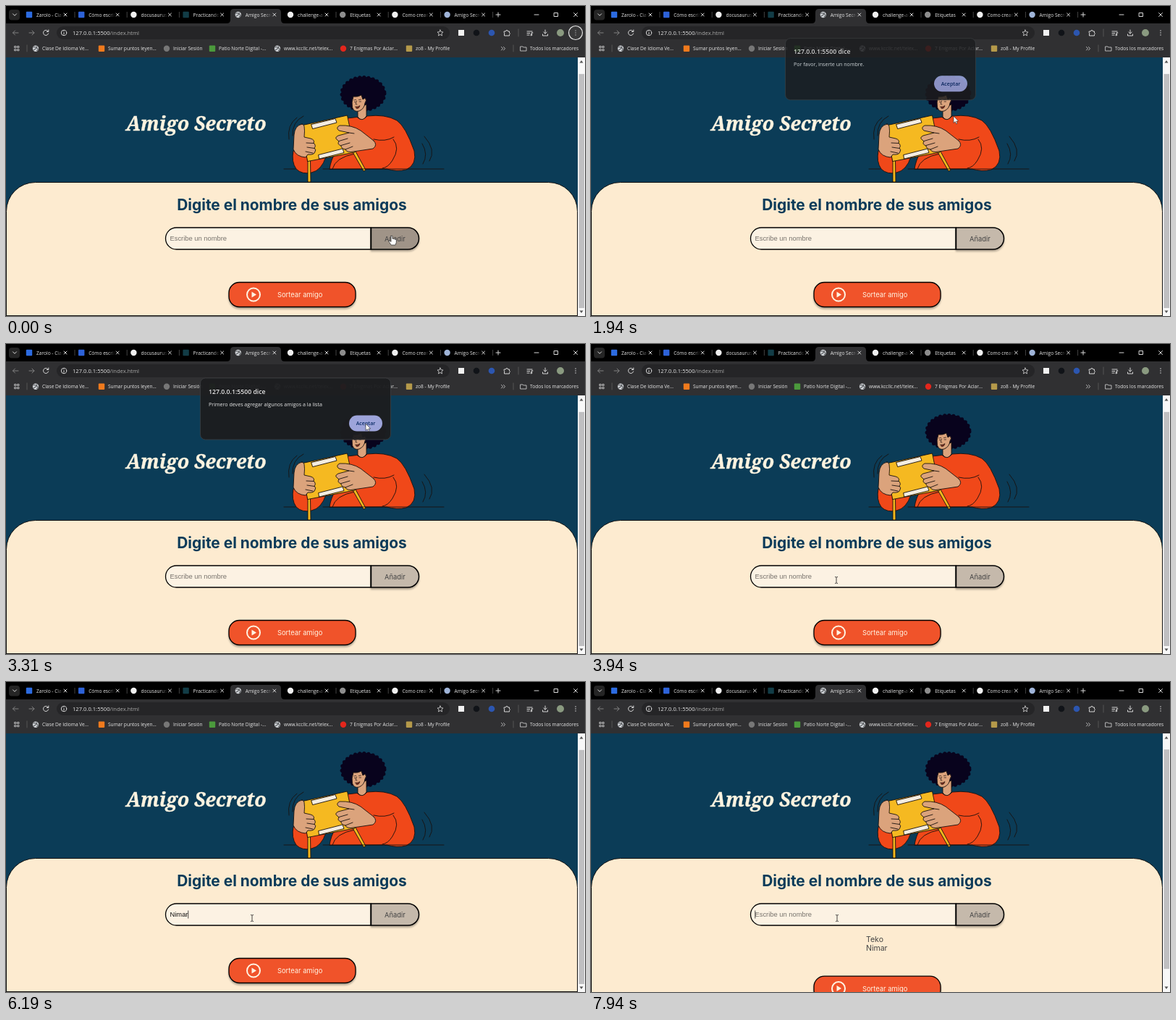
These frames come from a looping animation (800x428 px, 8000 ms). An HTML page:

```html
<!DOCTYPE html>
<html lang="es">
<head>
<meta charset="utf-8">
<title>Amigo Secreto</title>
<style>
  html, body { margin: 0; width: 100%; height: 100%; overflow: hidden; background: #000; }
  svg { display: block; width: 100vw; height: 100vh; }
  text { white-space: pre; }
  .ui { font: 6.6px "Open Sans", "Noto Sans", sans-serif; fill: #e6e6e6; }
  .page { font: 9.37px Inter, sans-serif; }
  .field { font: 9.37px "Liberation Sans", Arial, sans-serif; }
  .icon { fill: none; stroke: #d8d8d8; stroke-width: 1; stroke-linecap: round; stroke-linejoin: round; }
  .ink { stroke: #19110f; stroke-width: .9; stroke-linejoin: round; stroke-linecap: round; }
</style>
</head>
<body>
<svg viewBox="0 0 800 428">
  <defs>
    <linearGradient id="fade" gradientUnits="userSpaceOnUse" x1="27" x2="36.5" y1="0" y2="0">
      <stop stop-color="#e6e6e6"/><stop offset="1" stop-color="#e6e6e6" stop-opacity="0"/>
    </linearGradient>
    <filter id="shadow" x="-20%" y="-30%" width="140%" height="180%">
      <feDropShadow dx="0" dy="2.3" stdDeviation="1.3" flood-opacity=".3"/>
    </filter>
    <g id="globe">
      <circle r="4.2" fill="#cfd2d6"/>
      <path d="M-3.4-1.4Q-1-3 .2-1.6T-1 1-2.6 2.6M1.4-3.4Q.8-1 2.6 0T1.2 3.2" fill="none" stroke="#55585c" stroke-width="1.1"/>
    </g>
  </defs>

  <!-- page -->
  <rect y="71" width="790" height="357" fill="#0b3c57"/>
  <text x="166" y="172" fill="#fdf3e0" stroke="#fdf3e0" stroke-width=".4" style="font:italic 700 26.6px 'Noto Serif',serif">Amigo Secreto</text>

  <g class="ink">
    <ellipse cx="493.500" cy="121" rx="29.500" ry="22.500" fill="#08031d" stroke="#08031d" stroke-width="5" stroke-dasharray="0 6.2"/>
    <ellipse cx="493.500" cy="121" rx="30.500" ry="23.500" fill="#08031d" stroke="none"/>
    <path d="M447 225Q449 212 455 203L440 165Q462 155 485 153.500Q492 160 499 152Q524 149 540 158Q552 166 564 200Q568 219 553 226Q540 229 526 225Z" fill="#f04819"/>
    <path d="M486 143V153Q492 161 498 152V136Z" fill="#dba37c"/>
    <path d="M480 125Q477 133 478.500 140Q481 147 488 145Q495 142 496 134Q499 130 496 127L493 129 491 123Q486 126 480 125Z" fill="#dba37c"/>
    <path d="M483 139Q486 140 489 137.500Q488 142 484.500 141.500Z" fill="#7a2a1c" stroke-width=".6"/>
    <path d="M481 130l2.500-.5M487.500 129.500l3-.5M484.500 131l-1.500 4.500 2 .3M481.500 132.500h1.500M488 132h2.500" fill="none" stroke-width=".7"/>
    <path d="M451 225Q455 209 482 204M508 184Q524 188 536 181M535 184Q545 196 534 213Q528 223 520 224" fill="none"/>
    <path d="M397 200Q394 215 401 225Q409 233 422 230Q436 227 442 208L412 203Z" fill="#f04819"/>
    <path d="M417 211V243H421L420.500 211ZM478 200L494 228 497 226.500 482 199Z" fill="#f3b81d"/>
    <path d="M408 165L471.500 151 482 202 417 214.500Z" fill="#f5b921"/>
    <path d="M422 163.500L455 155.500 457 161 424 169.500ZM432 205.500L465 197 467 202.500 433 211Z" fill="#f5ede0"/>
    <path d="M409 163Q399 165 398 178L397 198Q401 208 414 209L417 205Q426 206 427 201Q429 199 426 196Q429 193 425 189Q427 185 421 183L412 181Q413 172 412 166Q411 163 409 163Z" fill="#dba37c"/>
    <path d="M415 189L425 189.500M416 195L426 196.500M414 201L424 203" fill="none"/>
    <path d="M508 186L490 172Q478 164 461 165Q455 168 460 172L474 175 459 179Q453 182 458 185L460 187Q457 191 463 193Q463 197 469 198Q471 203 480 201L507 197Q514 192 508 186Z" fill="#dba37c"/>
    <path d="M460 186.500L472 183M463 192.500L475 189M469 198L479 194M474 175L481 176" fill="none"/>
    <path d="M384 225H400M438 225H605M391 184Q388 164 402 154M396 179Q395 160 411 152M575 190Q584 205 576 218M578 180Q595 199 585 214" fill="none"/>
  </g>

  <path d="M.5 480V283.500A40 40 0 0 1 40.500 243.500H749.500A40 40 0 0 1 789.500 283.500V480" fill="#fdebd0" stroke="#111"/>
  <text x="395" y="282" text-anchor="middle" fill="#0b3b59" style="font:700 20.9px Inter,sans-serif">Digite el nombre de sus amigos</text>

  <path d="M504 306H235.500A15 15 0 0 0 235.500 336H504Z" fill="#fcf2e3" stroke="#000" stroke-width="1.300"/>
  <text id="entry" class="field" x="226.500" y="324"></text>
  <path id="caret" d="M0 315.500v11" stroke="#222" stroke-width=".8"/>
  <path id="add" d="M504.500 306H555.500A15 15 0 0 1 555.500 336H504.500Z" stroke="#000" stroke-width="1.500" filter="url(#shadow)"/>
  <text class="page" x="537.500" y="324.500" text-anchor="middle" fill="#444">Añadir</text>
  <g id="list" style="font:10.54px Inter,sans-serif" fill="#444">
    <text x="380" y="358.600"></text><text x="380" y="370.900"></text>
  </g>
  <g id="lower">
    <rect id="draw" x="308" y="381.500" width="175" height="34" rx="14.500" stroke="#000" stroke-width="1.300" filter="url(#shadow)"/>
    <circle cx="342" cy="398.500" r="9" fill="none" stroke="#fff3e2" stroke-width="2"/>
    <path d="M339.500 394.500L346 398.500 339.500 402.500Z" fill="#fff3e2"/>
    <text class="page" x="375" y="402" fill="#fff3e2">Sortear amigo</text>
    <path d="M0 427.500H790" stroke="#111"/>
  </g>

  <rect x="790" y="71" width="10" height="357" fill="#f8f8f8"/>
  <path d="M792.500 78.500L795 75 797.500 78.500ZM792.500 420.500L795 424 797.500 420.500Z" fill="#555"/>
  <rect id="thumb" x="791.500" width="7.500" fill="#bfbfc1"/>

  <!-- browser -->
  <rect width="800" height="24" fill="#000"/>
  <rect y="24" width="800" height="47" fill="#303032"/>
  <path d="M305 24Q310 24 310 19V9Q310 4 315 4H375Q380 4 380 9V19Q380 24 385 24Z" fill="#303032"/>
  <rect x="4" y="5" width="15" height="14.500" rx="4" fill="#252525"/>
  <rect x="70" y="28" width="543" height="18" rx="9" fill="#252527"/>
  <g id="tabs" class="ui"></g>
  <g class="icon">
    <path d="M9.500 10.800L12 13.300 14.500 10.800M677 12H683M680 9V15M730 12H736M757.500 9.500H762.500V14.500H757.500ZM784.500 9.500L789.500 14.500M789.500 9.500L784.500 14.500"/>
    <path d="M17 37H9.500M12.500 34L9.500 37 12.500 40M32 37H39M36 34L39 37 36 40" stroke="#808080"/>
    <path d="M58.200 35A3.600 3.600 0 1 0 58.600 38M58.800 33V35.500H56.300"/>
    <circle cx="80" cy="37" r="3.700"/><path d="M80 36.800V39M80 35V35.100"/>
    <path d="M600 33L601.200 35.700 604 36 601.900 38 602.500 41 600 39.400 597.500 41 598.100 38 596 36 598.800 35.700Z" stroke-width=".8"/>
    <path d="M688.500 35H690.500A1.500 1.500 0 0 1 693.500 35H695.500V37A1.500 1.500 0 0 1 695.500 39.500V41H688.500V39A1.500 1.500 0 0 0 688.500 37Z"/>
    <path d="M708 32V42M29 54V63M701 54V63" stroke="#666" stroke-width=".7"/>
    <path d="M720 35H727M720 37.500H724M720 40H723M726.500 40V36.500L728 37"/><circle cx="725.700" cy="40" r=".9"/>
    <path d="M745 33V38M742.800 36L745 38.200 747.200 36M741.500 39V41H748.500V39"/>
    <path d="M787 34V34.100M787 37V37.100M787 40V40.100" stroke-width="1.500"/>
    <path d="M711 56H714L715 57H719V62H711ZM684.500 56.500L686.500 58.700 684.500 61M687.500 56.500L689.500 58.700 687.500 61" stroke-width=".8"/>
    <path d="M12 55.500h2v2h-2zM16 55.500h2v2h-2zM12 59.700h2v2h-2zM16 59.700h2v2h-2z" stroke-width=".8"/>
  </g>
  <rect x="625" y="33" width="8" height="8" fill="#f2f2f2"/>
  <circle cx="650" cy="37" r="4.300" fill="#101318"/>
  <circle cx="671" cy="37" r="4.300" fill="#2c56b0"/>
  <circle cx="766" cy="37" r="5" fill="#8a9a80"/>
  <circle id="menuRing" cx="787" cy="37" r="9.500" fill="#4a4a4a" fill-opacity=".35" stroke="#e4e4e4" stroke-width="1.200"/>
  <text class="ui" x="92" y="39.800" style="font-size:7.6px">127.0.0.1:5500<tspan fill="#a9a9a9">/index.html</tspan></text>
  <g id="bookmarks" class="ui"></g>

  <!-- alert -->
  <g id="dialog" class="ui">
    <rect x="268.500" y="47" width="263" height="85" rx="7" fill="#1d1e20" fill-opacity=".96" stroke="#3d3f42" stroke-width=".8"/>
    <text x="280" y="68.500" style="font-size:8.7px;font-weight:600">127.0.0.1:5500 dice</text>
    <text id="message" x="280" y="85.500" style="font-size:7.1px"></text>
    <rect id="focus" x="472.300" y="97" width="49.500" height="25" rx="12.500" fill="#1d1e20" stroke="#b9d0fb" stroke-width="1.300"/>
    <rect id="accept" x="474" y="98.500" width="46" height="22" rx="11"/>
    <text x="497" y="112.200" text-anchor="middle" style="font-size:7.1px;font-weight:600;fill:#0b2c66">Aceptar</text>
  </g>

  <g id="pointer" stroke-linejoin="round">
    <path id="arrow" d="M0 0V9.500L2.200 7.500 3.700 10.800 5.200 10.100 3.800 7H6.700Z" fill="#fff" stroke="#222" stroke-width=".6"/>
    <path id="hand" d="M-1 .7Q0-.6 1 .7V4.300Q2.200 3.600 2.900 4.700Q4 4.200 4.600 5.200Q6.200 4.800 6.300 6.400V9.300L5 13H-.8L-3.800 8.500Q-4.400 7-3 6.900L-1 8.500Z" fill="#fff" stroke="#222" stroke-width=".7"/>
    <path id="beam" d="M-2-4.500Q0-4.500 0-3.500Q0-4.500 2-4.500M0-3.500V3.500M-2 4.500Q0 4.500 0 3.500Q0 4.500 2 4.500" fill="none" stroke="#333" stroke-width=".9"/>
  </g>
</svg>
<script>
const $ = id => document.getElementById(id);
const show = (id, on) => $(id).style.display = on ? '' : 'none';
const set = (id, attrs) => Object.entries(attrs).forEach(([k, v]) => $(id).setAttribute(k, v));
const clamp = v => Math.max(0, Math.min(1, v));
const LOOP = 8000, LINE = 12.3;

const mark = (x, y, color, round) => color === 'globe'
  ? `<use href="#globe" x="${x}" y="${y}"/>`
  : `<rect x="${x - 4.2}" y="${y - 4.2}" width="8.4" height="8.4" rx="${round ? 4.2 : 1}" fill="${color}"/>`;

$('tabs').innerHTML = [
  ['Zarolo - Clases', '#2c6be0'], ['Cómo escribir', '#2d62d8'], ['docusaurus', '#f0f0f0', true],
  ['Practicando', '#123c46'], ['Amigo Secreto', 'globe'], ['challenge-amigo', '#f0f0f0', true],
  ['Etiquetas', '#8d8d8d', true], ['Como crear', '#f0f0f0', true], ['Amigo Secreto', '#9fb4d8', true]
].map(([label, color, round], i) => `<g transform="translate(${42 + 72.2 * i} 0)">
  ${mark(-10, 12, color, round)}<text y="14.5" style="fill:url(#fade)">${label}</text>
  <path class="icon" d="M38 10l4 4M42 10l-4 4"/>
  ${i === 3 || i === 4 ? '' : '<path d="M53 8v8" stroke="#555" stroke-width=".8"/>'}</g>`).join('');

$('bookmarks').innerHTML = [
  [50, 'Clase De Idioma Ve...', 'globe'], [141, 'Sumar puntos leyen...', '#f07a1d'],
  [231, 'Iniciar Sesión', '#777', true], [294, 'Patio Norte Digital -...', '#4b9a3c'],
  [384, 'www.kccllc.net/telex...', 'globe'], [475, '7 Enigmas Por Aclar...', '#e3261c', true],
  [566, 'zo8 - My Profile', '#b59a4a']
].map(([x, label, ...icon]) => mark(x - 9, 58.7, ...icon) + `<text x="${x}" y="61.2">${label}</text>`).join('')
  + '<text x="724" y="61.2">Todos los marcadores</text>';

const path = [
  [0, 533, 317], [1000, 533, 317], [1500, 497, 112], [1780, 497, 112], [1940, 501, 152],
  [2400, 423, 396], [2900, 423, 396], [3250, 497, 110], [3420, 497, 110], [3900, 339, 326],
  [4600, 339, 326], [5000, 340, 326], [LOOP, 340, 326]
];
const alerts = [
  { open: 250, press: 1720, close: 1900, text: 'Por favor, inserte un nombre.' },
  { open: 2480, press: 3300, close: 3400, text: 'Primero deves agregar algunos amigos a la lista' }
];
const entries = [
  { name: 'Nimar', start: 5150, step: 190, enter: 6560 },
  { name: 'Teko', start: 6900, step: 170, enter: 7750 }
];
const CLICK_FIELD = 4250;

function pointerAt(t) {
  const i = path.findIndex(p => p[0] > t);
  const [t0, x0, y0] = path[i - 1], [t1, x1, y1] = path[i];
  const u = (t - t0) / (t1 - t0), k = u * u * (3 - 2 * u);
  return [x0 + (x1 - x0) * k, y0 + (y1 - y0) * k];
}

function drawAlert(t) {
  const a = alerts.find(a => t >= a.open && t < a.close + 120);
  show('dialog', a);
  if (!a) return;
  const p = (1 - (1 - clamp((t - a.open) / 190)) ** 2) * (1 - clamp((t - a.close) / 120) ** 2);
  set('dialog', { opacity: p, transform: `translate(0 ${-20 * (1 - p)})` });
  $('message').textContent = a.text;
  show('focus', t < a.press);
  set('accept', { fill: t < a.press ? '#a9c3f7' : '#9da4da' });
}

function drawEntry(t) {
  const added = entries.filter(e => t >= e.enter);
  const current = entries.find(e => t >= e.start && t < e.enter);
  const typed = current ? current.name.slice(0, 1 + Math.floor((t - current.start) / current.step)) : '';
  const entry = $('entry');
  entry.textContent = typed || 'Escribe un nombre';
  entry.setAttribute('fill', typed ? '#111' : '#77726c');

  // The caret restarts its blink after every edit.
  const edits = [CLICK_FIELD, ...entries.flatMap(e =>
    [...[...e.name].map((_, i) => e.start + i * e.step), e.enter])];
  const last = Math.max(...edits.filter(e => e <= t));
  show('caret', t >= CLICK_FIELD && (t - last) % 1000 < 500);
  set('caret', { transform: `translate(${226.8 + (typed ? entry.getComputedTextLength() : 0)} 0)` });

  const names = added.map(e => e.name).reverse();
  [...$('list').children].forEach((line, i) => line.textContent = names[i] || '');
  const shift = names.length * LINE, scale = 334 / (369 + shift);
  set('lower', { transform: `translate(0 ${shift})` });
  set('thumb', { y: 83 + 12 * scale, height: 357 * scale });
}

function drawPointer(t) {
  const [x, y] = pointerAt(t);
  const inside = (l, top, r, b) => x > l && x < r && y > top && y < b;
  const overAdd = inside(504, 305, 571, 337), overDraw = inside(307, 381, 483, 416);
  const overField = inside(220, 305, 504, 337);
  set('pointer', { transform: `translate(${x} ${y})` });
  show('hand', overAdd || overDraw);
  show('beam', overField);
  show('arrow', !(overAdd || overDraw || overField));
  set('add', { fill: overAdd ? '#a09488' : '#c5b9ab' });
  set('draw', { fill: overDraw ? '#d6461f' : '#f0532a' });
}

function render() {
  const t = performance.now() % LOOP;
  show('menuRing', t < 250);
  drawAlert(t);
  drawEntry(t);
  drawPointer(t);
  requestAnimationFrame(render);
}
render();
</script>
</body>
</html>
```
